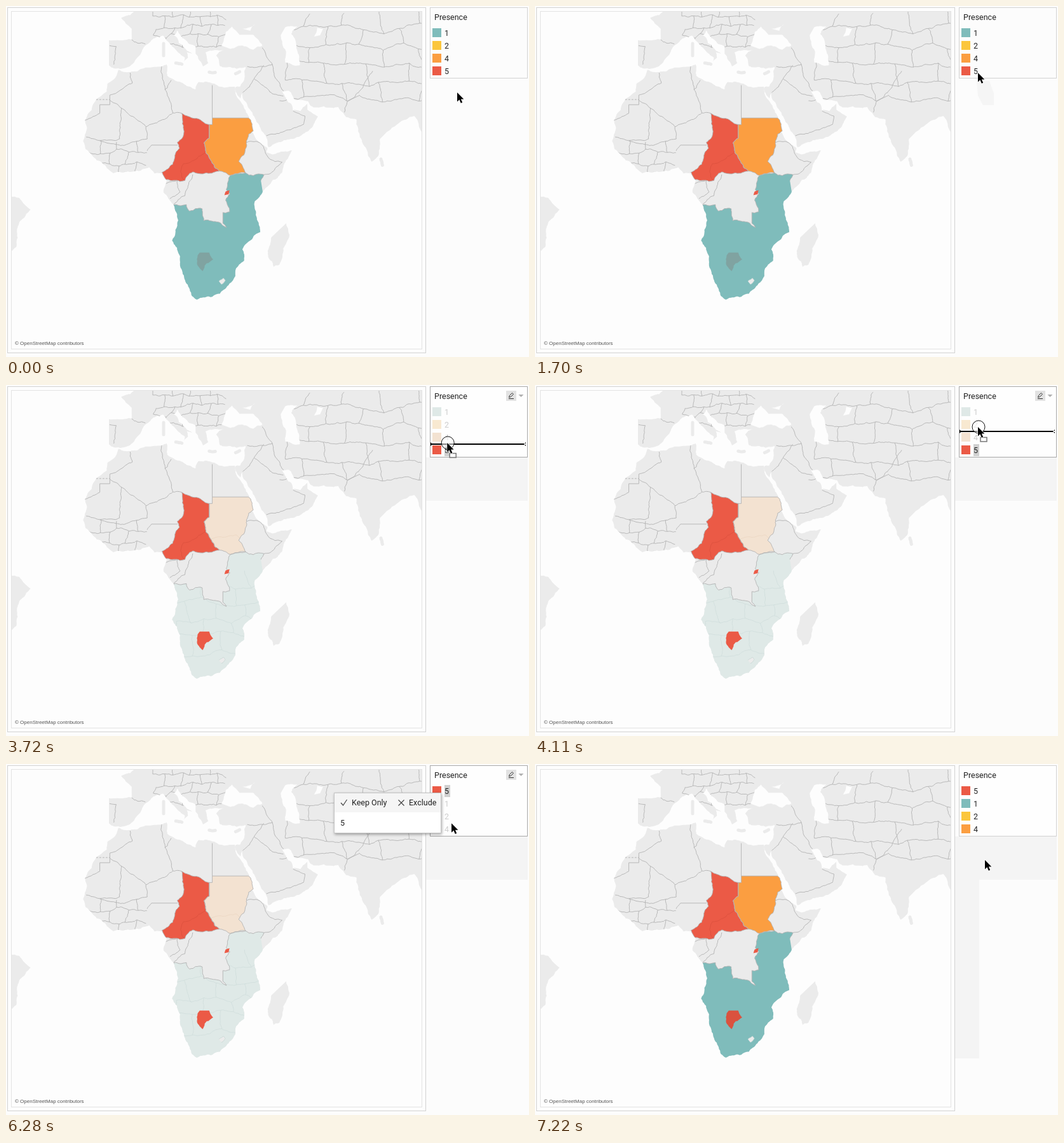
Write an HTML page that moves like this. It is 823 by 552 pixels and loops after 8 s.

```html
<!DOCTYPE html>
<html lang="en">
<head>
<meta charset="utf-8">
<title>Presence map</title>
<style>
html, body { margin: 0; height: 100%; overflow: hidden; background: #fcfcfc; }
svg { display: block; width: 100vw; height: 100vh; font: 12.5px Roboto, sans-serif; }
.land { fill: #ebebeb; }
.water { fill: #fdfdfd; }
.isles { fill: none; stroke: #ebebeb; stroke-width: 5; stroke-linecap: round; }
.borders { fill: none; stroke: #b3b3b3; stroke-width: .9; stroke-linejoin: round; }
.c1 { fill: #7fbcbb; }
.c2 { fill: #fbc63d; }
.c4 { fill: #fb9e41; }
.c5 { fill: #eb5a46; }
.dim .c1 { fill: #dfe9e7; }
.dim .c2 { fill: #f8e9d1; }
.dim .c4 { fill: #f3e2d1; }
.inner { fill: none; stroke: #cddcda; stroke-width: .7; visibility: hidden; }
.dim .inner { visibility: visible; }
.row text { fill: #222; }
.dim .row text { fill: #ccc; }
.dim .row.picked text { fill: #222; }
.mark { fill: #d0d0d0; visibility: hidden; }
.dim .mark { visibility: visible; }
#tip { filter: drop-shadow(1px 2px 2px #0005); }
</style>
</head>
<body>
<svg id="stage" viewBox="0 0 823 552">
  <clipPath id="frame"><rect x="9" y="9" width="645" height="530"/></clipPath>
  <rect width="823" height="552" fill="#fcfcfc"/>
  <g id="panel" fill="#f4f4f4">
    <rect x="661" y="114" width="160" height="68"/>
    <rect id="strip" x="661" y="182" width="38" height="281"/>
  </g>
  <path id="trail" d="M695 118H715L722 137V156H705L697 141Z" fill="#f5f5f5"/>
  <rect x="2.5" y="2.5" width="658" height="543" fill="#fdfdfd" stroke="#d2d2d2"/>
  <rect x="8.5" y="8.5" width="646" height="531" fill="none" stroke="#e3e3e3"/>
  <g id="map" clip-path="url(#frame)"></g>
  <text x="14" y="533" fill="#555" style="font:8px 'Liberation Sans',Arial,sans-serif">© OpenStreetMap contributors</text>

  <rect id="box" x="667.5" y="2.5" width="153" height="111"/>
  <text x="674" y="22" fill="#222">Presence</text>
  <g id="tools">
    <rect x="787" y="9" width="16" height="16" fill="#e2e2e2"/>
    <path d="M791.5 19.5l1-3 4-4 2 2-4 4zM791 21.5h8" fill="none" stroke="#333"/>
    <path d="M806.5 15h8l-4 4z" fill="#b0b0b0"/>
  </g>
  <g id="legend"></g>
  <g id="tip">
    <rect x=".5" y=".5" width="168" height="63" fill="#fff" stroke="#c4c4c4"/>
    <rect x="1" y="1" width="167" height="30" fill="#f5f5f5"/>
    <path d="M11 16l3.5 4 6-9M101.5 11.5l9 9m0-9l-9 9" fill="none" stroke="#444" stroke-width="1.2"/>
    <g fill="#222"><text x="28" y="20">Keep Only</text><text x="118" y="20">Exclude</text><text x="10" y="52">5</text></g>
  </g>
  <path id="drop" d="M668 -1H818V1H668ZM668 -3l3 3-3 3zM818 -3l-3 3 3 3z"/>
  <g id="pointer">
    <circle id="press" cx="1" cy="0" r="10" fill="#fff8" stroke="#111"/>
    <rect id="ghost" x="4" y="16.5" width="10" height="6.5" fill="#fff" stroke="#777" stroke-width="1.5"/>
    <path d="M0 0V14.5L3.4 11.3 5.8 16.8 8.2 15.8 5.9 10.5H10.4Z" stroke="#fff" stroke-width="1.2" paint-order="stroke"/>
  </g>
</svg>
<script>
const $ = id => document.getElementById(id);

// Key points as "lon lat": commas part points, semicolons part lines.
const eurasia = [
  '1 51,-2 49,-5 48.4,-1.5 46,-1.5 43.5,-9 43.3,-9 37,-6 36.2,-2 36.8,0 38.7,3 42,5 43.3,8.8 44.4,11 42.5,16 39,15.7 38,17 39,16.6 40.4,18.4 40,14 42.6,12.4 44.6,13.6 45.6,16 43.5,19.5 41.8',
  '19.5 40,22 36.7,23.7 37.6,22.8 40.3,24 40.7,29 41,26.3 39.5,27.5 36.8,30.6 36.6,33 36.1,36 36.6,35.7 34,34.3 31.3,32.5 31,32.6 29.8,34.2 27.8,34.9 29.4,35 28,39 22,42.6 16.5',
  '43.5 12.8,52 15.6,57.8 19,59.8 22.4,56.3 24.5,56.3 26.2,54 24.1,51.5 24.3,51.2 26,50 26.7,48 29.8,50.2 30,52 27.5,56.5 27,57.5 25.6,66.5 25.3',
  '69 22.3,72.5 21.5,73 18,76.3 10,77.5 8.1,79.8 10.3,80.2 15.5,86.8 20.7,91.5 22.6,94.3 17.5,99 15,99 52'
].join();
const southCoast = '41.6 -1.7,39 -4.8,39.4 -8.5,40.8 -14.8,34.9 -20.2,35.5 -23.6,32.8 -26,32.6 -28.2,27.5 -33.2,22 -34.2,20 -34.8,18.3 -33.8,15.2 -27,14.4 -22.3,11.8 -17.5,13.8 -11,12.3 -6';
const africa = [
  '-5.9 35.8,-2 35.2,10 37.2,10.2 34.2,15.3 32.2,19.5 30.4,20.5 32.5,23 32.6,29 30.9,32.4 31.2,33 28.5,37.2 21.5,37.4 18.8,39.5 15.3,43.2 12.4,42.8 11.2,45 10.5,51.2 11.9,48 4.6,42.5 -.5',
  southCoast,
  '9 -2,9.7 3.5,8.7 4.5,6 4.3,4.3 6.3,-2 4.8,-7.5 4.4,-13 8.6,-16.8 12.5,-17.5 14.8,-16.2 19,-16.9 21.3,-13 27.7,-9.7 29.8,-9.5 32,-6.5 34.2'
].join();
const brazil = '-44 -3,-38.5 -3.7,-34.8 -7.5,-39 -13,-39.5 -19.5,-44 -23';
const madagascar = '49.3 -12,50.4 -15.6,47.1 -24.9,45.2 -25.5,43.4 -22.5,44.4 -16.5';
const isles = '80.5 9,81 7;9 42.5,9 39.5;13 37.6,15 37.3;24 35.2,26 35.1;32.7 34.8,34 35.3';
const blackSea = '28 42,29.5 45.3,31.5 46.5,34 44.6,38.5 44.6,41.5 42,38.5 41,35 42,31 41.2;35 46,39 47,37.5 45.5';
const caspian = '47.5 44.5,49.3 40.5,49 37.8,53.8 37,52.7 42,51 44.8,53 46.5,49 46.3;58.5 44.2,59.5 46.2,61.5 46,60.5 44.5';

const southEdge = '12.3 -6,16.5 -5.9,17.5 -8,19.5 -7.2,21.7 -7.3,22.2 -11.1,25.4 -11.4,29.7 -13.3,28.5 -12,28.5 -8.5,30.7 -8.3,29.4 -4.5,30.8 -2.4,29.6 -.9,31 3.6,36 4.5,38.5 3.6,42 3.9,41 2';
const south = southCoast + ',' + southEdge;
const sharedEdge = '24 20,24 15.7,22.3 14.3,22.9 11,27.4 5.1';
const chad = sharedEdge + ',22 4.2,18.6 4.8,16 2,9.8 2.3,8.5 4.7,12 7.3,14.2 12.5,13.5 14.4,15.6 17,15 23.4,24 20';
const sudan = sharedEdge + ',31 3.7,36 4.5,33.7 8.3,36.3 13,37 17,38.5 18,36.9 22,25 22,25 20,24 20';
const rwanda = '29 -2.8,29.4 -1.6,30.7 -1.2,30.4 -2.5';
const lesotho = '27.2 -29.7,28.7 -28.8,29.3 -29.5,28 -30.6';
const botswana = '20.9 -21.2,24 -21.2,25.3 -23.3,22.5 -25.2,21.8 -26.8,20 -24.7,20.2 -22';

const africanBorders = '-8.7 27.3,-8.7 26,-12 26,-12 23.4,-17 21.3;-2 35,-1.3 32.2,-8.7 28.8,-8.7 27.3,-4.9 25,-5.5 15.5,-12 15,-16.5 16.1;-4.9 25,3.2 19.3,12 23.5,9.5 30.3,8.4 36.9;9.5 30.3,11.5 33;12 23.5,15 23.4;25 31.6,25 22;3.2 19.3,3.6 15.5,-4 13.4,-12 14.8;3.6 11.7,5 13.5,13.6 13.5;9.7 1,13.5 2,14.4 -1.8,11.1 -3.9;18.6 4,16 -3,12.3 -5.8;36.4 14.4,40.9 14.1,42.5 11,44 9,48 8,45 5,42 3.9';
const asianBorders = '-8.8 42,-6.6 41.8,-7.4 37.2;-1.5 43.4,3 42.4;41.5 41.5,44.8 37.2,36.5 36.7;44.8 37.2,45.5 34,48.5 30;42 37,38.8 33.4,44.7 29.2,48.4 28.5;38.8 33.4,35 29.5;42.8 16.5,47 17.2,52 19,55 20,55.5 22.6,51.6 24.1;68.5 23.7,69.6 27,74.6 31,77.8 35.5';

// Web Mercator
const scale = 274;
const project = point => {
  const [lon, lat] = point.split(' ').map(v => v * Math.PI / 180);
  return [205 + scale * lon, 284 - scale * Math.asinh(Math.tan(lat))];
};
const noise = (x, y) => {
  const n = Math.sin(x * 12.9898 + y * 78.233) * 43758.5453;
  return n - Math.floor(n) - .5;
};
// Midpoint displacement; lines along a parallel or meridian stay straight.
function roughen(a, b) {
  const size = Math.hypot(b[0] - a[0], b[1] - a[1]);
  if (size < 4 || Math.abs(a[0] - b[0]) < .01 || Math.abs(a[1] - b[1]) < .01) return [b];
  const x = (a[0] + b[0]) / 2, y = (a[1] + b[1]) / 2;
  const sway = Math.min(size * .22, 4);
  const mid = [x + noise(x, y) * sway, y + noise(y, x) * sway];
  return [...roughen(a, mid), ...roughen(mid, b)];
}
function traceLine(line) {
  const points = line.split(',').map(project);
  const rough = points.slice(1).flatMap((p, i) => roughen(points[i], p));
  return 'M' + [points[0], ...rough].map(p => p.map(v => v.toFixed(1)).join(' ')).join('L');
}
const trace = lines => lines.split(';').map(traceLine).join('');
const shape = (lines, attrs) => `<path d="${trace(lines)}" ${attrs}/>`;
const clip = (id, lines) => `<clipPath id="${id}">${shape(lines, '')}</clipPath>`;

// Country-like cells: a brick pattern whose corners are shaken.
function cells(lon, lat, dx, dy, cols, rows) {
  const corner = (i, j) => {
    const x = lon + i * dx, y = lat + j * dy;
    return `${x + noise(x, y) * dx * .6} ${y + noise(y, x) * dy * .6}`;
  };
  const lines = [];
  for (let i = 0; i < cols; i++) {
    for (let j = 0; j < rows; j++) {
      lines.push(corner(i, j) + ',' + corner(i + 1, j));
      if ((i + j) % 2) lines.push(corner(i, j) + ',' + corner(i, j + 1));
    }
  }
  return lines.join(';');
}

const land = [eurasia, africa, brazil, madagascar].join(';');
$('map').innerHTML =
  clip('ashore', [eurasia, africa].join(';')) + clip('southern', south) +
  shape(land, 'class="land"') +
  shape(isles, 'class="isles"') +
  '<g clip-path="url(#ashore)">' +
  shape(cells(6, 42, 3, 2.2, 8, 4), 'class="borders"') +
  shape(cells(49, 28, 6.5, 4.5, 8, 5), 'class="borders"') +
  shape(cells(-15, 4, 3, 3.6, 6, 3), 'class="borders"') +
  shape([africanBorders, asianBorders].join(';'), 'class="borders"') + '</g>' +
  shape([blackSea, caspian].join(';'), 'class="water"') +
  shape('-13.2 27.5,-8.7 27.5', 'class="borders" stroke-dasharray="3 2"') +
  shape(south, 'class="c1"') +
  shape(cells(12, -28, 5, 5.4, 6, 5), 'class="inner" clip-path="url(#southern)"') +
  shape(lesotho, 'class="land" stroke="#c4d4d2" stroke-width=".7"') +
  shape(sudan, 'class="c4"') +
  shape('24 8.7,33 10,34 9', 'class="inner" style="stroke:#ead5c0"') +
  shape(chad, 'class="c5"') +
  shape('22.9 11,15.5 7.5,14.6 5,16 2', 'fill="none" stroke="#d94f3d" stroke-width=".7"') +
  shape([southEdge, chad, sudan].join(';'), 'class="borders"') +
  shape(rwanda, 'class="c5"') +
  shape(botswana, 'id="botswana"');

$('legend').innerHTML = [1, 2, 4, 5].map(n => `<g id="row${n}" class="row${n === 5 ? ' picked' : ''}">
  <rect class="c${n}" x="671" width="14" height="14"/>
  ${n === 5 ? '<rect class="mark" x="690" y="-2" width="9" height="19"/>' : ''}
  <text x="690" y="12">${n}</text></g>`).join('');

// Pointer stops: time, x, y
const stops = [
  [0, 710, 136], [1140, 710, 136], [1700, 697, 105], [1880, 697, 105], [1990, 693, 102],
  [3550, 693, 102], [4110, 697, 66], [4360, 697, 51], [4410, 697, 46],
  [4560, 697, 46], [4730, 697, 38], [6000, 697, 38], [6280, 701, 93], [6630, 708, 151], [8000, 708, 151]
];
const pointerAt = t => {
  const i = stops.findIndex(s => s[0] > t);
  const [a, b] = [stops[i - 1], stops[i]];
  const k = (t - a[0]) / (b[0] - a[0]);
  return [a[1] + (b[1] - a[1]) * k, a[2] + (b[2] - a[2]) * k];
};
const show = (id, on) => $(id).setAttribute('visibility', on ? 'visible' : 'hidden');
const move = (id, x, y) => $(id).setAttribute('transform', `translate(${x} ${y})`);

function draw(now) {
  const t = now % 8000;
  const within = (from, to) => t >= from && t < to;
  const [x, y] = pointerAt(t);
  const dim = within(2770, 7165);
  const hover = within(2680, 6400);
  const sorted = t >= 5450;
  const dragging = within(3580, 5450);

  $('stage').classList.toggle('dim', dim);
  $('botswana').setAttribute('fill', dim ? '#eb5a46' : t < 2770 ? '#80a3a1' : '#da523f');
  $('box').setAttribute('stroke', hover ? '#a8a8a8' : '#d2d2d2');
  $('box').setAttribute('fill', t < 2680 ? '#fcfcfc' : '#fefefe');
  show('tools', hover);
  show('panel', t >= 2770);
  $('strip').style.display = t >= 7165 ? '' : 'none';
  show('trail', within(1600, 2770));

  (sorted ? [5, 1, 2, 4] : [1, 2, 4, 5]).forEach((n, i) => move('row' + n, 0, 35 + 20 * i));

  show('tip', within(2860, 3550) || within(5860, 6400));
  move('tip', sorted ? 516 : 513, sorted ? 45 : 112);

  move('pointer', x, y);
  show('press', within(2680, 5390) || within(7110, 7220));
  show('ghost', dragging);
  show('drop', dragging);
  move('drop', 0, 33 + 20 * Math.round((y - 33) / 20));
  requestAnimationFrame(draw);
}
requestAnimationFrame(draw);
</script>
</body>
</html>
```
